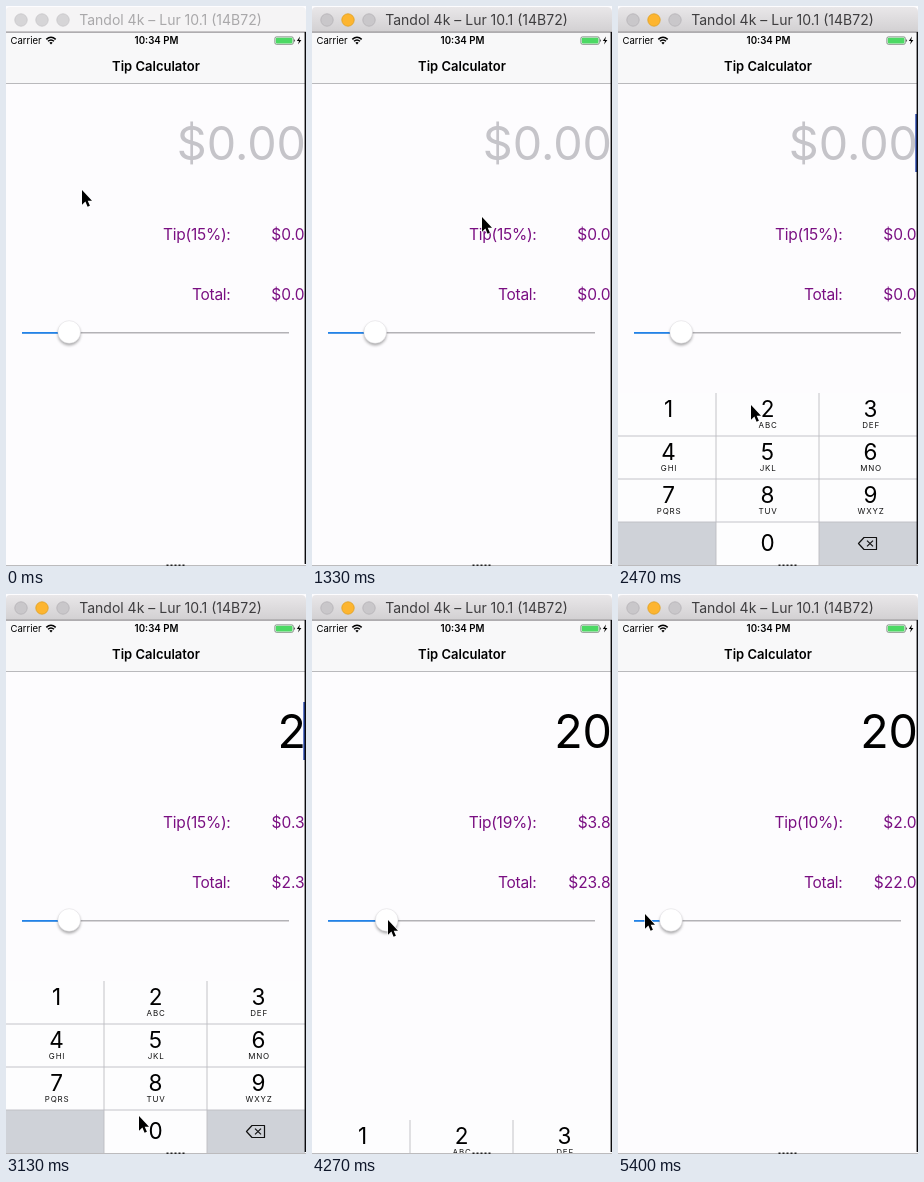
Write an HTML page that moves like this. It is 300 by 560 pixels and loops after 5470 ms.

```html
<!DOCTYPE html>
<html lang="en">
<head>
<meta charset="utf-8">
<title>Tip Calculator</title>
<style>
  html, body { margin: 0; width: 100%; height: 100%; overflow: hidden; background: #fdfcfe; }
  svg { display: block; width: 300px; height: 560px; font-family: Inter, "Liberation Sans", sans-serif; }
  .end { text-anchor: end; }
  .mid { text-anchor: middle; }
  .label { font-size: 15.5px; fill: #7a0f82; }
  .name { letter-spacing: -.25px; }
  .digit { font-size: 22.5px; fill: #000; text-anchor: middle; }
  .abc { font-size: 8px; letter-spacing: .8px; fill: #111; text-anchor: middle; }
</style>
</head>
<body>
<svg viewBox="0 0 300 560">
  <defs>
    <linearGradient id="bar" x2="0" y2="1">
      <stop stop-color="#e9e7e9"/><stop offset="1" stop-color="#d2d0d2"/>
    </linearGradient>
    <filter id="soft" x="-50%" y="-50%" width="200%" height="200%">
      <feGaussianBlur stdDeviation="1.8"/>
    </filter>
    <clipPath id="screen"><path d="M0 26H299V560H0Z"/></clipPath>
  </defs>

  <rect width="300" height="560" fill="#fdfcfe"/>

  <!-- window title bar -->
  <path id="titlebar" d="M0 26V5Q0 1 4 1H295Q300 1 300 6V26Z"/>
  <g stroke-width=".8">
    <circle class="lamp" cx="15" cy="14" r="6.2"/>
    <circle class="lamp" cx="36" cy="14" r="6.2" id="amber"/>
    <circle class="lamp" cx="57" cy="14" r="6.2"/>
  </g>
  <text id="caption" class="mid" x="164.5" y="19" font-size="14">Tandol 4k – Lur 10.1 (14B72)</text>

  <g clip-path="url(#screen)">
    <!-- status and navigation bars -->
    <rect y="26" width="299" height="51" fill="#f8f8f9"/>
    <path d="M0 77.5H299" stroke="#b9b9bc"/>
    <text x="4.5" y="38" font-size="9.5">Carrier</text>
    <g fill="none" stroke="#000" stroke-width="1.5">
      <path d="M40.3 33.4Q45 29 49.7 33.4M42 35.3Q45 32.6 48 35.3"/>
    </g>
    <path d="M43.4 36.7Q45 35.3 46.6 36.7L45 38.4Z"/>
    <text class="mid" x="150.5" y="38" font-size="9.7" font-weight="600">10:34 PM</text>
    <rect x="268.9" y="30.9" width="18.4" height="7.4" rx="1.5" fill="#fff" stroke="#55685a" stroke-width=".7"/>
    <rect x="269.8" y="31.8" width="16.6" height="5.6" rx=".8" fill="#4cd964"/>
    <path d="M288.4 33Q289.8 34.6 288.4 36.2Z"/>
    <path d="M294 30.6L290.8 35H293L292 38.6L295.4 34H293.2Z"/>
    <text class="mid" x="150" y="64.6" font-size="13" font-weight="600">Tip Calculator</text>

    <!-- amounts -->
    <text id="amount" class="end" x="300" y="153.8" font-size="46.6"></text>
    <rect id="caret" x="297.3" y="108" width="2" height="58" fill="#2447b0"/>
    <text id="rate" class="end label name" x="224.6" y="234"></text>
    <text id="tip" class="end label" x="308.3" y="234"></text>
    <text class="end label name" x="224.6" y="294">Total:</text>
    <text id="total" class="end label" x="308.3" y="294"></text>

    <!-- slider -->
    <path d="M16 326.8H283" stroke="#b3b2b6" stroke-width="1.6"/>
    <path id="fill" stroke="#2183ea" stroke-width="1.8"/>
    <g id="thumb">
      <circle cy="328.2" r="11.2" fill="#000" opacity=".34" filter="url(#soft)"/>
      <circle cy="326" r="11.3" fill="#fff" stroke="#dcdbde" stroke-width=".5"/>
    </g>

    <g id="pad"></g>
  </g>

  <path d="M0 26.1H300" stroke="#979598" stroke-width="1.2"/>
  <path d="M299.3 26V558" stroke="#0b0b0e" stroke-width="1.4"/>
  <path d="M0 559.5H300" stroke="#bcbbbd"/>
  <path d="M160.5 559.2H179" stroke="#222" stroke-width="1.6" stroke-dasharray="2 2"/>

  <path id="cursor" d="M0 0V14.8L3.4 11.6L5.6 16.8L7.9 15.8L5.7 10.7H10Z"
        stroke="#fff" stroke-width="1.1" stroke-linejoin="round" paint-order="stroke"/>
</svg>

<script>
const LOOP = 5470, STEP = 1000 / 15;
const $ = id => document.getElementById(id);

// Number pad, drawn in its raised position
const COLS = [[0, 98], [98, 103], [201, 98]], MIDS = [50.5, 149.5, 252.5], TOP = 387, ROW = 43;
const KEYS = ["1", "2 ABC", "3 DEF", "4 GHI", "5 JKL", "6 MNO", "7 PQRS", "8 TUV", "9 WXYZ", "", "0", "del"];
const GREY = "#cfd2d8", WHITE = "#fdfdfe";

$("pad").innerHTML = KEYS.map((key, i) => {
  const c = i % 3, r = Math.floor(i / 3), y = TOP + r * ROW;
  const [x, w] = COLS[c], [digit, abc] = key.split(" ");
  let out = `<rect id="key${i}" x="${x}" y="${y}" width="${w}" height="${ROW + 1}" fill="${r == 3 && c != 1 ? GREY : WHITE}"/>`;
  if (key == "del") {
    out += `<path d="M240.5 537.5L246 531.5H258.5V543.5H246Z" fill="none" stroke="#111" stroke-width="1.2" stroke-linejoin="round"/>
      <path d="M249 534.6L255 540.4M255 534.6L249 540.4" stroke="#111" stroke-width="1.2"/>`;
  } else if (digit) {
    out += `<text class="digit" x="${MIDS[c]}" y="${y + (r == 3 ? 29 : 23.5)}">${digit}</text>`;
  }
  if (abc) out += `<text class="abc" x="${MIDS[c] + .6}" y="${y + 35.3}">${abc}</text>`;
  return out;
}).join("") +
  `<path d="M0 430H299M0 473H299M0 516H299M98 387V560M201 387V560" stroke="#bdbdc2" stroke-width=".9"/>`;

// Tracks: [ms, value, ...]
const CURSOR = [
  [0, 76, 184], [333, 84, 196], [467, 84, 196], [1333, 170, 211], [1600, 222, 158],
  [1867, 222, 158], [2200, 137, 413], [2467, 133, 399], [2733, 133, 401], [3067, 133, 522],
  [3400, 133, 522], [4000, 65, 327], [4200, 65, 327], [4267, 76, 326], [4533, 98, 327],
  [4733, 98, 327], [5067, 46, 327], [5333, 46, 327], [5400, 27, 320]
];
const THUMB = [[4200, 63.2], [4267, 74.7], [4533, 97], [4733, 97], [5067, 53]];
const DROP = [
  [2000, 175], [2067, 90], [2133, 38], [2200, 14], [2267, 5], [2333, 1], [2400, 0],
  [4200, 0], [4267, 139], [4333, 167], [4400, 175]
];

const smooth = p => p * p * (3 - 2 * p);

function at(track, t) {
  const n = track.findIndex(k => k[0] > t);
  if (n == 0) return track[0].slice(1);
  if (n < 0) return track[track.length - 1].slice(1);
  const a = track[n - 1], b = track[n], p = smooth((t - a[0]) / (b[0] - a[0]));
  return a.slice(1).map((v, i) => v + (b[i + 1] - v) * p);
}

const within = (t, from, to) => t >= from && t < to;
const money = v => "$" + v.toFixed(2);

function draw(t) {
  const active = t >= 530;
  $("titlebar").setAttribute("fill", active ? "url(#bar)" : "#f5f4f5");
  $("caption").setAttribute("fill", active ? "#3e3d3f" : "#a9a8aa");
  document.querySelectorAll(".lamp").forEach(lamp => {
    const lit = active && lamp.id == "amber";
    lamp.setAttribute("fill", lit ? "#fdb530" : active ? "#c9c7ca" : "#d6d5d7");
    lamp.setAttribute("stroke", lit ? "#dfa023" : active ? "#b5b3b6" : "#c8c7c9");
  });

  const typed = t < 2730 ? "" : t < 3460 ? "2" : "20";
  const [x] = at(THUMB, t);
  const percent = Math.floor((x - 27) / 2.4);
  const bill = Number(typed), tip = bill * percent / 100;
  $("amount").textContent = typed || "$0.00";
  $("amount").setAttribute("fill", typed ? "#000" : "#c5c4c9");
  $("rate").textContent = `Tip(${percent}%):`;
  $("tip").textContent = money(tip);
  $("total").textContent = money(bill + tip);
  $("caret").setAttribute("opacity", within(t, 1930, 4060) ? 1 : within(t, 4060, 4130) ? .5 : 0);

  $("fill").setAttribute("d", `M16 326.8H${x}`);
  $("thumb").setAttribute("transform", `translate(${x})`);

  $("pad").setAttribute("transform", `translate(0 ${at(DROP, t)[0]})`);
  $("key1").setAttribute("fill", within(t, 2590, 2730) ? GREY : WHITE);
  $("key10").setAttribute("fill", within(t, 3260, 3460) ? GREY : WHITE);

  $("cursor").setAttribute("transform", `translate(${at(CURSOR, t).join(" ")})`);
}

const start = performance.now();
function tick() {
  const t = (performance.now() - start) % LOOP;
  draw(Math.round(Math.floor((t + 3.4) / STEP) * STEP));
  requestAnimationFrame(tick);
}
tick();
</script>
</body>
</html>
```
